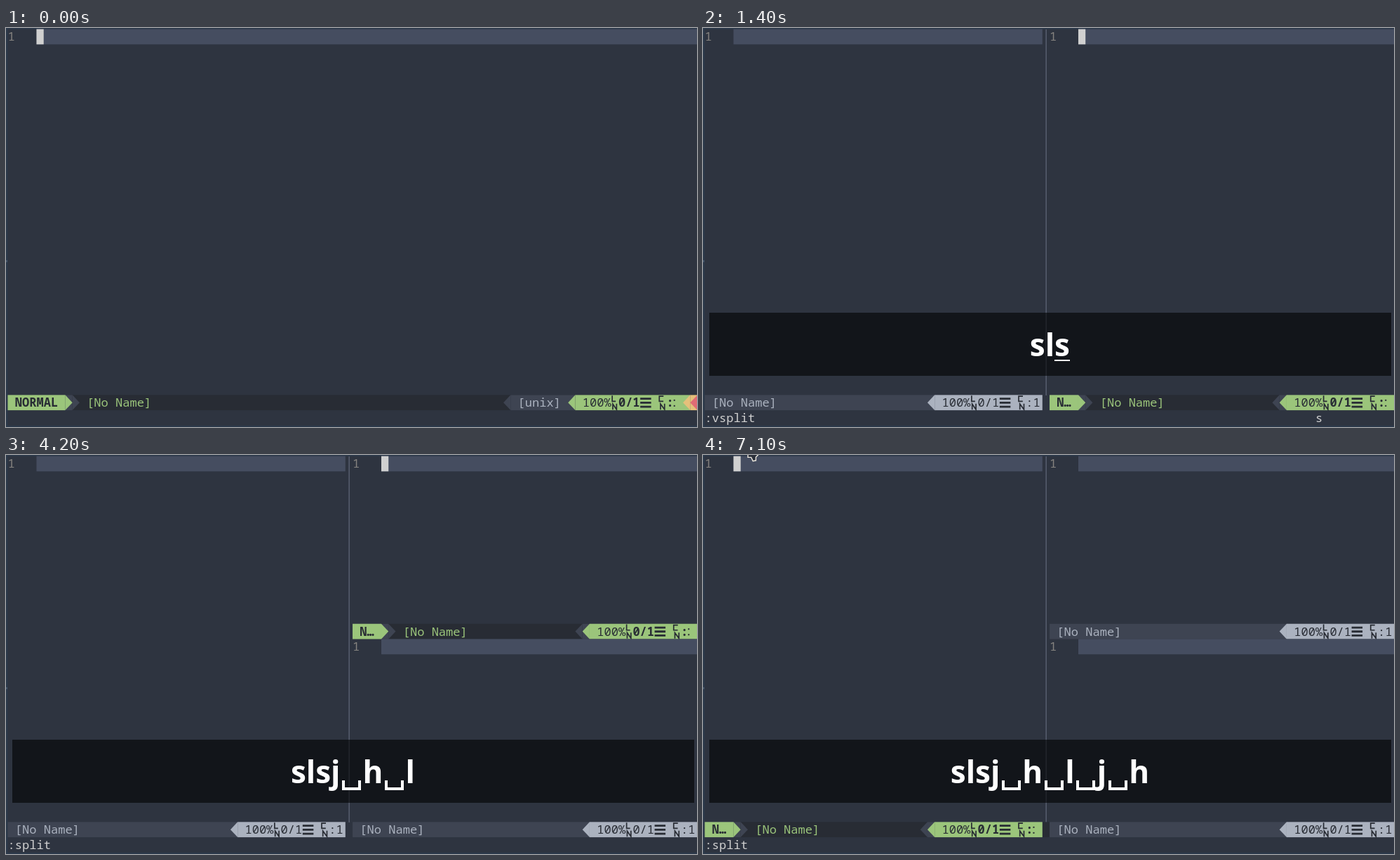
An HTML page that plays this animation: 985 px wide and 569 px high, repeating every 7.2 s.

```html
<!DOCTYPE html>
<html lang="en">
<head>
<meta charset="utf-8">
<title>Window splits</title>
<style>
  html, body { margin: 0; width: 100%; height: 100%; overflow: hidden; background: #2e3440; }
  #stage { position: absolute; left: 0; top: 0; width: 985px; height: 569px; overflow: hidden; }
  svg { position: absolute; left: 0; top: 0; }
  svg text { font: 17.07px "Noto Sans Mono", monospace; white-space: pre; }
  svg .bold { font-weight: 700; }
  #panel { position: absolute; left: 9px; top: 406px; width: 972px; height: 90px; background: rgba(0, 0, 0, .6); }
  #keys {
    position: absolute; left: -.6px; top: 15px; width: 972px;
    display: flex; justify-content: center;
    font: 700 44px/60px "Noto Sans", sans-serif; color: #fff;
  }
  .key { position: relative; }
  .recent::after { content: ""; position: absolute; left: 0; right: 0; top: 52px; height: 2px; background: #fff; }
  .blank { width: 32px; }
  .blank::before {
    content: ""; position: absolute; left: 2.5px; top: 43px; width: 19px; height: 10px;
    border: solid #fff; border-width: 0 4px 4px;
  }
</style>
</head>
<body>
<div id="stage">
  <svg id="screen" width="985" height="569"></svg>
  <div id="panel"><div id="keys"></div></div>
  <svg width="985" height="569">
    <path id="pointer" d="M64-14V3.4H68.7L71.2 8.6L75.4 7.8L75.4 3L78.5 0Z" fill="#2b303b" stroke="#eee9df" stroke-width="1.4"/>
  </svg>
</div>
<script>
const LOOP = 7200, RECENT = 200, CELL = 10.24, ROW = 21.74;
const BG = '#2e3440', LINE = '#454d60', DARK = '#282c34', GRAY = '#3e4452',
      GREEN = '#9bc57b', SILVER = '#abb2bf', EDGE = '#2b394a';

// [time, key]; a space is shown as an open box
const KEYS = [[300, 's'], [600, 'l'], [1400, 's'], [1700, 'j'], [2700, ' '], [3000, 'h'],
  [3800, ' '], [4000, 'l'], [4600, ' '], [4700, 'j'], [5100, ' '], [5300, 'h']];
// [time, layout, active window, command line, pending keys]
const STATES = [
  [0, 'one', '', '', ''],
  [300, 'one', '', '', 's'],
  [600, 'two', 'right', ':vsplit', ''],
  [1400, 'two', 'right', ':vsplit', 's'],
  [1700, 'three', 'bottom', ':split', ''],
  [2700, 'three', 'bottom', ':split', '<20>'],
  [2900, 'three', 'left', ':split', ''],
  [3800, 'three', 'left', ':split', '<20>'],
  [4000, 'three', 'top', ':split', ''],
  [4600, 'three', 'top', ':split', '<20>'],
  [4700, 'three', 'bottom', ':split', ''],
  [5100, 'three', 'bottom', ':split', '<20>'],
  [5200, 'three', 'left', ':split', '']
];
const POINTER = [[6800, 29, 16], [6900, 20, 11], [7000, 9, 5], [7100, 0, 0]];

const $ = id => document.getElementById(id);
const X = col => 2.5 + col * CELL;
const Y = row => 1.6 + row * ROW;
const esc = s => s.replace(/</g, '&lt;');

const rect = (x, y, w, h, fill) => `<rect x="${x}" y="${y}" width="${w}" height="${h}" fill="${fill}"/>`;
const cells = (from, to, row, fill) => rect(X(from), Y(row), X(to) - X(from), ROW, fill);
const text = (col, row, s, fill, bold) =>
  `<text x="${X(col)}" y="${Y(row) + 16.8}" fill="${fill}"${bold ? ' class="bold"' : ''}>${esc(s)}</text>`;

function arrow(col, row, dir, fill) {
  const [base, tip] = dir > 0 ? [col, col + 1] : [col + 1, col];
  const y = Y(row);
  return `<path d="M${X(base)} ${y}L${X(tip)} ${y + ROW / 2}L${X(base)} ${y + ROW}Z" fill="${fill}"/>`;
}

const glyph = (col, row, d, width) =>
  `<path transform="translate(${X(col)} ${Y(row)})" d="${d}" fill="none" stroke="${DARK}" stroke-width="${width}"/>`;

// Percentage, line and column read-out; the column part sits off the cell grid
function ruler(col, row, active) {
  const tail = col + 10.7;
  let out = text(col, row, '100%', DARK) +
    glyph(col + 4, row, 'M1.5 .8V9H6.5M2.3 21V12.8L7.7 20.6V12.5', 1.7) +
    text(col + 5, row, '0/1', DARK, active) +
    glyph(col + 8, row, 'M.5 5.3H16M.5 11H16M.5 16.7H16', 2.8) +
    glyph(tail, row, 'M6 1.8H0V9H5.8M1.7 21V12.8L7.5 20.6V12.5', 1.7) +
    text(tail + 1, row, ':', DARK, active);
  if (!active) return out + text(tail + 2, row, '1', DARK);
  const x = X(tail + 2);
  return out + rect(x, Y(row) + 6.5, 2, 2, DARK) + rect(x, Y(row) + 14.5, 2, 2, DARK);
}

function wideStatus() {
  const r = 24;
  return cells(0, 96, r, DARK) +
    cells(0, 9, r, GRAY) + arrow(9, r, 1, GRAY) +
    cells(0, 8, r, GREEN) + arrow(8, r, 1, GREEN) +
    text(1, r, 'NORMAL', DARK, true) + text(11, r, '[No Name]', GREEN) +
    arrow(69, r, -1, GRAY) + cells(70, 79, r, GRAY) + text(71, r, '[unix]', SILVER) +
    arrow(78, r, -1, GREEN) + cells(79, 95, r, GREEN) + ruler(80, r, true) +
    arrow(94, r, -1, '#e5c07b') + cells(95, 96, r, '#e5c07b') + arrow(95, r, -1, '#e06c75');
}

function status(left, row, active) {
  const right = left ? left + 1 : 0, end = left ? 96 : 47;
  if (!active) {
    return cells(left, end, row, GRAY) + text(left + 1, row, '[No Name]', SILVER) +
      arrow(right + 31, row, -1, SILVER) + cells(right + 32, end, row, SILVER) +
      ruler(right + 33, row, false);
  }
  return cells(left, end, row, DARK) +
    cells(left, left + 5, row, GRAY) + arrow(left + 5, row, 1, GRAY) +
    cells(left, left + 4, row, GREEN) + arrow(left + 4, row, 1, GREEN) +
    text(left + 1, row, 'N…', DARK, true) + text(left + 7, row, '[No Name]', GREEN) +
    arrow(right + 30, row, -1, GRAY) + cells(right + 31, end, row, GRAY) +
    arrow(right + 31, row, -1, GREEN) + cells(right + 32, end, row, GREEN) +
    ruler(right + 33, row, true);
}

function buffer(left, end, row, active) {
  return cells(left + 4, end, row, LINE) + text(left, row, '1', '#85837f') +
    (active ? cells(left + 4, left + 5, row, '#d0d0d0') : '');
}

function win(left, top, bottom, active) {
  return buffer(left, left ? 96 : 47, top, active) + status(left, bottom, active);
}

function screen([, layout, active, cmd, pending]) {
  let out = rect(0, 0, 985, 569, EDGE) + rect(2.5, 1.6, 983, 565.4, BG) + rect(0, 331, 2, 3, '#46566a');
  if (layout === 'one') {
    out += buffer(0, 96, 0, true) + wideStatus();
  } else {
    out += rect(488.5, 2, 1.3, 522, '#5d6577');
    if (active === 'left') out += cells(47, 48, 24, DARK);
    out += win(0, 0, 24, active === 'left');
    if (layout === 'two') out += win(48, 0, 24, true);
    else out += win(48, 0, 11, active === 'top') + win(48, 12, 24, active === 'bottom');
  }
  return out + text(0, 25, cmd, '#d0d0d0') + text(85, 25, pending, '#d0d0d0');
}

function strip(t) {
  return KEYS.filter(k => k[0] <= t).map(([at, key]) => {
    const cls = 'key' + (t < at + RECENT ? ' recent' : '') + (key === ' ' ? ' blank' : '');
    return `<span class="${cls}">${key === ' ' ? '&nbsp;' : key}</span>`;
  }).join('');
}

const latest = (list, t) => list.filter(e => e[0] <= t).pop();
let shownState, shownStrip;

function draw(t) {
  const state = latest(STATES, t), keys = strip(t), at = latest(POINTER, t);
  if (state !== shownState) $('screen').innerHTML = screen(shownState = state);
  if (keys !== shownStrip) $('keys').innerHTML = shownStrip = keys;
  $('panel').style.display = keys ? 'block' : 'none';
  $('pointer').style.display = at ? 'inline' : 'none';
  if (at) $('pointer').setAttribute('transform', `translate(${at[1]} ${at[2]})`);
}

const start = performance.now();
function tick() {
  draw((performance.now() - start) % LOOP);
  requestAnimationFrame(tick);
}
tick();
</script>
</body>
</html>
```
